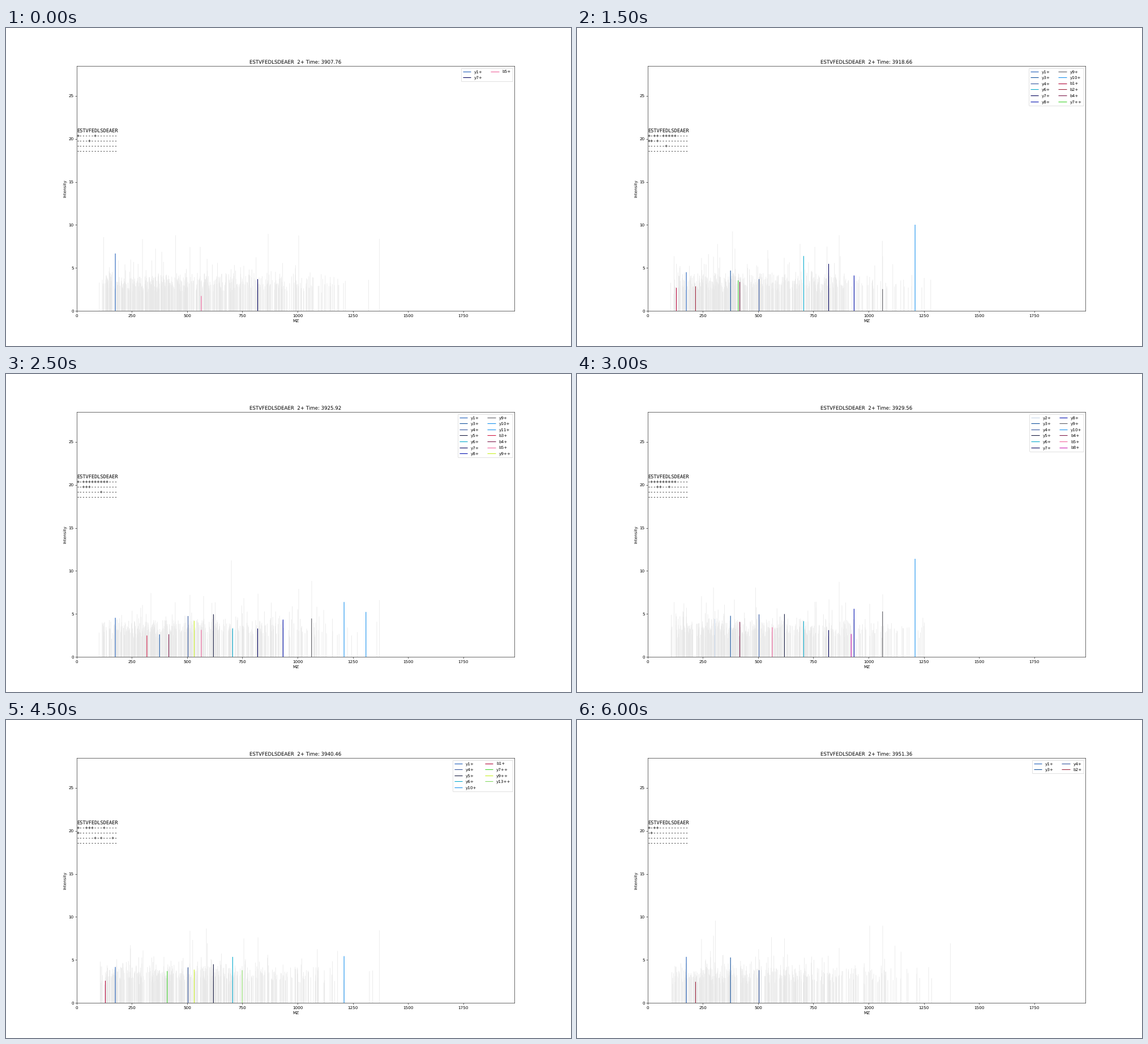
Animation, 998 px wide and 561 px high, one loop 6500 ms. Source, as a matplotlib script:

```python
import numpy as np
import matplotlib.pyplot as plt
from matplotlib.animation import FuncAnimation

W, H, DPI = 998, 561, 52
INTERVAL = 500
X_MAX, Y_MAX = 1982, 28.45
PEPTIDE = "ESTVFEDLSDEAER"
NOISE = "#e7e7e7"

RESIDUE = {"E": 129.043, "S": 87.032, "T": 101.048, "V": 99.068, "F": 147.068,
           "D": 115.027, "L": 113.084, "A": 71.037, "R": 156.101}
PROTON, WATER = 1.007, 18.011

# one palette per ion series, cycled by fragment length
PALETTES = {
    "y+": ["#1690ee", "#1c5cb8", "#c3d3e6", "#0f4f9c", "#2f529c", "#14183f",
           "#00a8cc", "#00005c", "#0010b0", "#5c5c62", "#1690ee"],
    "b+": ["#a84468", "#b00034", "#9c2038", "#d01440", "#7c1848", "#f0609a",
           "#d84080", "#c02878", "#cc18b0"],
    "y++": ["#3fd22c", "#90e020", "#c8f020", "#50a028", "#1c2c10", "#388020",
            "#84d860"],
    "b++": ["#f0a830", "#b85444", "#a04c28", "#f04e10", "#e08432"],
}
TYPICAL = {"y+": 4.4, "b+": 3.0, "y++": 3.6, "b++": 3.2}

# matched fragment ions of each scan
SCANS = [
    "y1+ y7+ b5+",
    "y1+ y3+ y5+ y7+ y8+ y10+ b3+ b4+ y9++",
    "y3+ y6+ y8+ y10+ y11+ b2+ y9++ b6++ b12++",
    "y1+ y3+ y4+ y6+ y7+ y8+ y9+ y10+ b1+ b2+ b4+ y7++",
    "y1+ y3+ y4+ y5+ y6+ y7+ y8+ y9+ y10+ b1+ b3+ b4+ b9+ y11++ y14++ b8++",
    "y1+ y3+ y4+ y5+ y6+ y7+ y8+ y9+ y10+ y11+ b3+ b4+ b5+ y9++",
    "y2+ y3+ y4+ y5+ y6+ y7+ y8+ y9+ y10+ b4+ b5+ b8+",
    "y1+ y3+ y4+ y5+ y6+ y7+ y8+ y10+ b4+ y7++",
    "y1+ y4+ y5+ y6+ y7+ y9+ y10+ b3+ y9++ b8++",
    "y1+ y4+ y5+ y6+ y10+ b1+ y7++ y9++ y13++",
    "y1+ y4+ y6+ y10+ b2+ y7++",
    "y6+ y9+ b1+ y7++ b4++ b10++",
    "y1+ y3+ y4+ b2+",
]
# m/z values where strong unmatched peaks keep coming back
RECURRING = np.array([120, 244, 298, 513, 757, 821, 867, 1005, 1064, 1371])

plt.rcParams["text.hinting"] = "none"


def parse(ion):
    """Split e.g. 'y11++' into its series 'y++' and length 11."""
    charges = "+" * ion.count("+")
    return ion[0] + charges, int(ion[1:-len(charges)])


def ion_mz(series, n):
    charge = series.count("+")
    if series[0] == "b":
        part, extra = PEPTIDE[:n], 0
    else:
        part, extra = PEPTIDE[-n:], WATER
    return (sum(RESIDUE[r] for r in part) + extra) / charge + PROTON


def ion_color(series, n):
    palette = PALETTES[series]
    step = n // 2 if series == "b++" else n
    return palette[step % len(palette)]


def ion_height(ion, series, rng):
    boost = 1.9 if ion == "y10+" else 1
    return TYPICAL[series] * boost * rng.lognormal(0, 0.2)


def coverage(ions, series):
    hits = [n for s, n in map(parse, ions) if s == series]
    return "".join("+" if i + 1 in hits else "-" for i in range(len(PEPTIDE)))


def noise_peaks(rng):
    count = rng.integers(400, 580)
    mz = 100 + 1310 * rng.beta(1.4, 2.7, count)
    height = rng.triangular(2.0, 3.2, 4.6, count)
    spikes = rng.random(count) < 0.2
    height[spikes] += rng.exponential(1.1, spikes.sum())
    strong = RECURRING[rng.random(RECURRING.size) < 0.7]
    return (np.append(mz, strong),
            np.append(height, rng.uniform(6, 9, strong.size)))


fig, ax = plt.subplots(figsize=((W + 1e-6) / DPI, (H + 1e-6) / DPI), dpi=DPI)


def stems(x, height, **style):
    ax.vlines(x, 0, height, snap=False, **style)


def draw(i):
    rng = np.random.default_rng(100 + i)
    ions = SCANS[i].split()
    ax.clear()
    stems(*noise_peaks(rng), color=NOISE, lw=1.1)
    for ion in ions:
        series, n = parse(ion)
        stems(ion_mz(series, n), ion_height(ion, series, rng),
              color=ion_color(series, n), lw=1.5, label=ion)

    rows = [PEPTIDE] + [coverage(ions, s) for s in PALETTES]
    for row, text in enumerate(rows):
        ax.text(0, 20.8 - 0.597 * row, text, family="DejaVu Sans Mono",
                fontsize=12)

    ax.set(xlim=(0, X_MAX), ylim=(0, Y_MAX), xlabel="MZ", ylabel="Intensity",
           xticks=range(0, 1751, 250), yticks=range(0, 26, 5))
    ax.set_title(f"{PEPTIDE}  2+ Time: {3907.756 + 3.6334 * i:.2f}")
    ax.legend(loc="upper right", ncol=2, labelspacing=0.535)
    return []


anim = FuncAnimation(fig, draw, frames=len(SCANS), interval=INTERVAL,
                     repeat=True, repeat_delay=0, blit=False)
plt.show()
```
